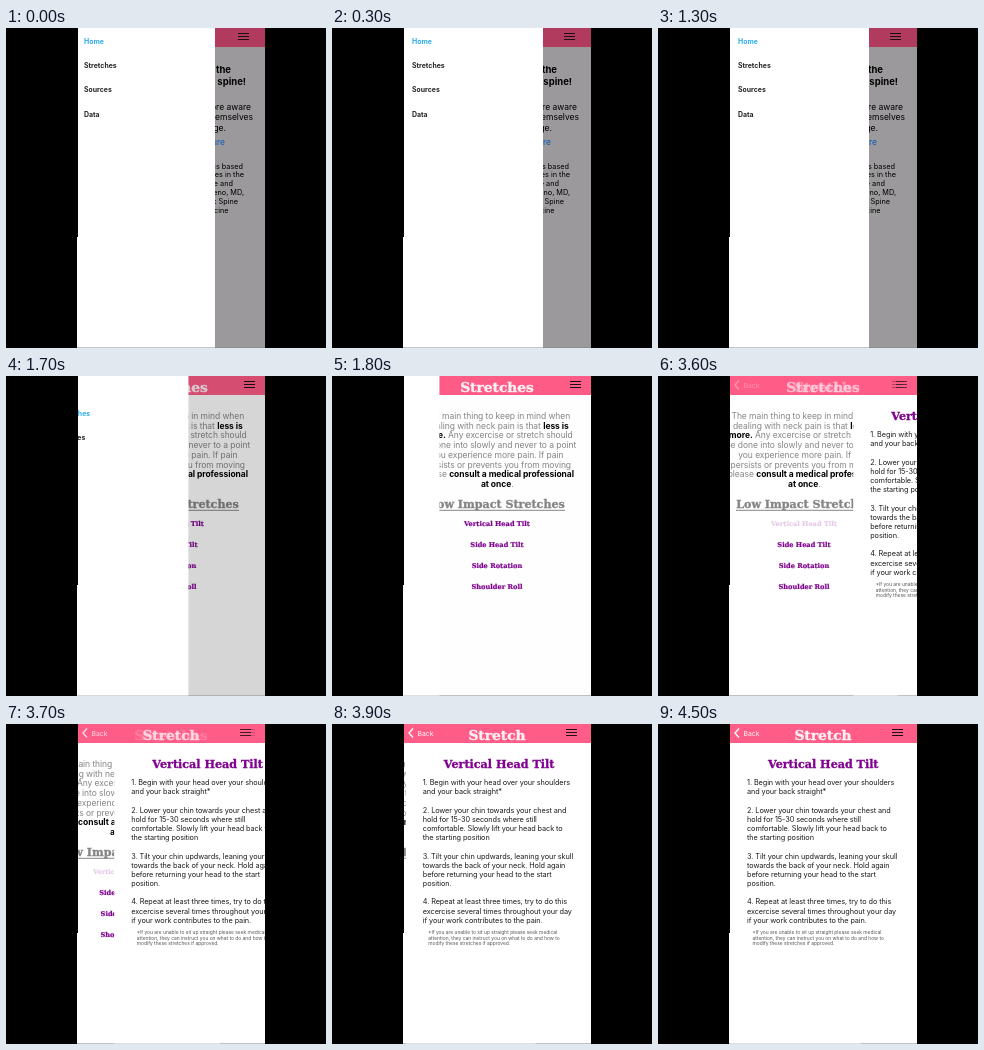
These frames come from a looping animation (320x320 px, 4.9 s). An HTML page:

```html
<!DOCTYPE html>
<html lang="en">
<head>
<meta charset="utf-8">
<title>Stretching app</title>
<style>
  html, body { margin: 0; width: 100%; height: 100%; overflow: hidden; background: #000; }
  svg { display: block; width: 100vw; height: 100vh; }
  text { font-family: Inter, "Open Sans", sans-serif; }
  .slab { font-family: "DejaVu Serif", "Noto Serif", serif; font-weight: 700; stroke-width: .03em; }
  .mid { text-anchor: middle; }
  .end { text-anchor: end; }
  .bold { font-weight: 700; fill: #000; }
  .nav { font-size: 6.95px; font-weight: 700; }
  .intro { font-size: 8.5px; letter-spacing: -.06px; fill: #858585; }
  .steps { font-size: 7.3px; letter-spacing: -.08px; fill: #1c1c1c; }
  .note { font-size: 4.9px; fill: #555; }
</style>
</head>
<body>
<svg viewBox="0 0 320 320">
  <defs><clipPath id="screen"><path d="M72 0H259V319.5H71V209H72Z"/></clipPath></defs>
  <rect width="320" height="320"/>
  <g clip-path="url(#screen)">
    <rect x="71" width="188" height="320" fill="#fff"/>
    <g id="home"></g>
    <g id="list"></g>
    <g id="detail"></g>
    <g id="bar"></g>
    <rect id="shade" x="71" width="188" height="320"/>
    <g id="drawer"></g>
  </g>
</svg>
<script>
const LOOP = 4900, STEP = 100;
const PAGE_W = 186.5, DRAWER_W = 139;
const OPEN_AT = -340, SELECT_AT = 1400, CLOSE_AT = 1654, PRESS_AT = 3050, PUSH_AT = 3534;
const PINK = '#ff5c88', PALE = '#fff0f4', PURPLE = '#800090', GREY = '#858585';

const $ = id => document.getElementById(id);
const clamp = v => Math.max(0, Math.min(1, v));
const text = (x, y, body, cls = '', attrs = '') =>
  `<text x="${x}" y="${y}" class="${cls}" ${attrs}>${body}</text>`;
const lines = (x, y, pitch, rows, cls, attrs) =>
  rows.map((row, i) => text(x, y + i * pitch, row, cls, attrs)).join('');
const slab = (x, y, size, color, body, attrs = '') =>
  text(x, y, body, 'slab mid', `font-size="${size}" fill="${color}" stroke="${color}" ${attrs}`);
const bold = body => `<tspan class="bold">${body}</tspan>`;
const menuIcon = (x, id) =>
  `<path id="${id}" d="M${x} 5.5h11m-11 3h11m-11 3h11" stroke="#1a1014" stroke-width="1.2"/>`;

// Right-aligned fragments: only their ends show beside the drawer.
const tail = (x, y, body, size, attrs = '') =>
  text(x, y, body, 'end', `font-size="${size}" ${attrs}`);

$('home').innerHTML =
  '<rect x="71" width="188" height="320" fill="#9b999b"/>' +
  '<rect x="71" width="188" height="19" fill="#b03b5e"/>' +
  menuIcon(232, 'homeMenu') +
  tail(225, 45, 'the', 9.5, 'font-weight="700"') +
  tail(240, 57, 'your spine!', 9.5, 'font-weight="700"') +
  tail(245, 82, 'more aware', 8.5) +
  tail(247, 92, 'themselves', 8.5) +
  tail(220, 102.5, 'change.', 8.5) +
  tail(219, 117, 'posture', 8.5, 'fill="#0a5cb8"') +
  [['is based', 237], ['stretches in the', 238], ['care and', 227],
   ['Meleno, MD,', 238], ['Park Spine', 232], ['Medicine', 222.5]]
    .map(([body, x], i) => tail(x, 140.5 + i * 8.9, body, 7.3)).join('');

$('list').innerHTML =
  '<rect x="71" width="188" height="320" fill="#fff"/>' +
  lines(165.3, 43, 9.7, [
    'The main thing to keep in mind when',
    'dealing with neck pain is that ' + bold('less is'),
    bold('more.') + ' Any excercise or stretch should',
    'be done into slowly and never to a point',
    'you experience more pain. If pain',
    'persists or prevents you from moving',
    'please ' + bold('consult a medical professional'),
    bold('at once') + '.'
  ], 'intro mid') +
  slab(165, 132, 11.1, GREY, 'Low Impact Stretches') +
  `<path d="M97 134.3H233" stroke="${GREY}"/>` +
  ['Vertical Head Tilt', 'Side Head Tilt', 'Side Rotation', 'Shoulder Roll']
    .map((name, i) => slab(165, 150 + i * 21.1, 6.65, PURPLE, name, i ? '' : 'id="link"')).join('');

$('detail').innerHTML =
  '<rect x="72" width="188" height="320" fill="#fff"/>' +
  slab(165.3, 44.3, 11.15, PURPLE, 'Vertical Head Tilt') +
  lines(89, 61.2, 9.17, [
    '1. Begin with your head over your shoulders',
    'and your back straight*',
    '',
    '2. Lower your chin towards your chest and',
    'hold for 15-30 seconds where still',
    'comfortable. Slowly lift your head back to',
    'the starting position',
    '',
    '3. Tilt your chin updwards, leaning your skull',
    'towards the back of your neck. Hold again',
    'before returning your head to the start',
    'position.',
    '',
    '4. Repeat at least three times, try to do this',
    'excercise several times throughout your day',
    'if your work contributes to the pain.'
  ], 'steps') +
  lines(94.5, 210, 5.7, [
    '*If you are unable to sit up straight please seek medical',
    'attention, they can instruct you on what to do and how to',
    'modify these stretches if approved.'
  ], 'note');

$('bar').innerHTML =
  `<rect x="71" width="188" height="19" fill="${PINK}"/>` +
  slab(165, 16.2, 13.8, PALE, 'Stretches', 'id="listTitle"') +
  slab(165, 16.2, 13.8, PALE, 'Stretch', 'id="detailTitle"') +
  '<g id="back"><path d="M81 4.5L77 9l4 4.5" fill="none" stroke="#fff" stroke-width="1.4"/>' +
  text(85.5, 11.5, 'Back', '', 'font-size="6.8" fill="#fff"') + '</g>' +
  menuIcon(238, 'listMenu') + menuIcon(234, 'detailMenu');

$('drawer').innerHTML =
  '<rect x="71" width="140" height="320" fill="#fff"/>' +
  ['Home', 'Stretches', 'Sources', 'Data']
    .map((name, i) => text(80, 15.6 + i * 24.35, name, 'nav', `id="nav${i}"`)).join('');

// Critically damped spring: share of the distance still to go.
function remaining(t, start) {
  const x = Math.max(0, t - start) * 0.01826;
  return (1 + x) * Math.exp(-x);
}

const shift = (id, x) => $(id).setAttribute('transform', `translate(${x.toFixed(2)} 0)`);
const fade = (id, v) => $(id).setAttribute('opacity', v.toFixed(3));
const show = (id, on) => $(id).setAttribute('display', on ? 'inline' : 'none');

function draw(t) {
  const closing = t >= CLOSE_AT;
  const opened = closing ? remaining(t, CLOSE_AT) : 1 - remaining(t, OPEN_AT);
  const pushed = 1 - remaining(t, PUSH_AT);

  show('home', !closing);
  show('list', closing);
  show('bar', closing);
  show('drawer', opened > 0.001);
  shift('drawer', (opened - 1) * DRAWER_W);
  fade('shade', closing ? 0.4 * opened ** 4 : 0);
  for (let i = 0; i < 4; i++) {
    const active = i === (t >= SELECT_AT ? 1 : 0);
    $('nav' + i).setAttribute('fill', active ? '#2cabea' : '#222');
  }

  fade('link', 1 - 0.8 * clamp((t - PRESS_AT) / 250));
  show('detail', t >= PUSH_AT);
  shift('detail', (1 - pushed) * PAGE_W);
  shift('list', -0.3 * pushed * PAGE_W);
  for (const id of ['listTitle', 'listMenu']) fade(id, 1 - pushed);
  for (const id of ['detailTitle', 'detailMenu', 'back']) fade(id, pushed);
}

const began = performance.now();
function tick() {
  const t = (performance.now() - began) % LOOP;
  draw(Math.floor(t / STEP) * STEP);
  requestAnimationFrame(tick);
}
draw(0);
requestAnimationFrame(tick);
</script>
</body>
</html>
```
